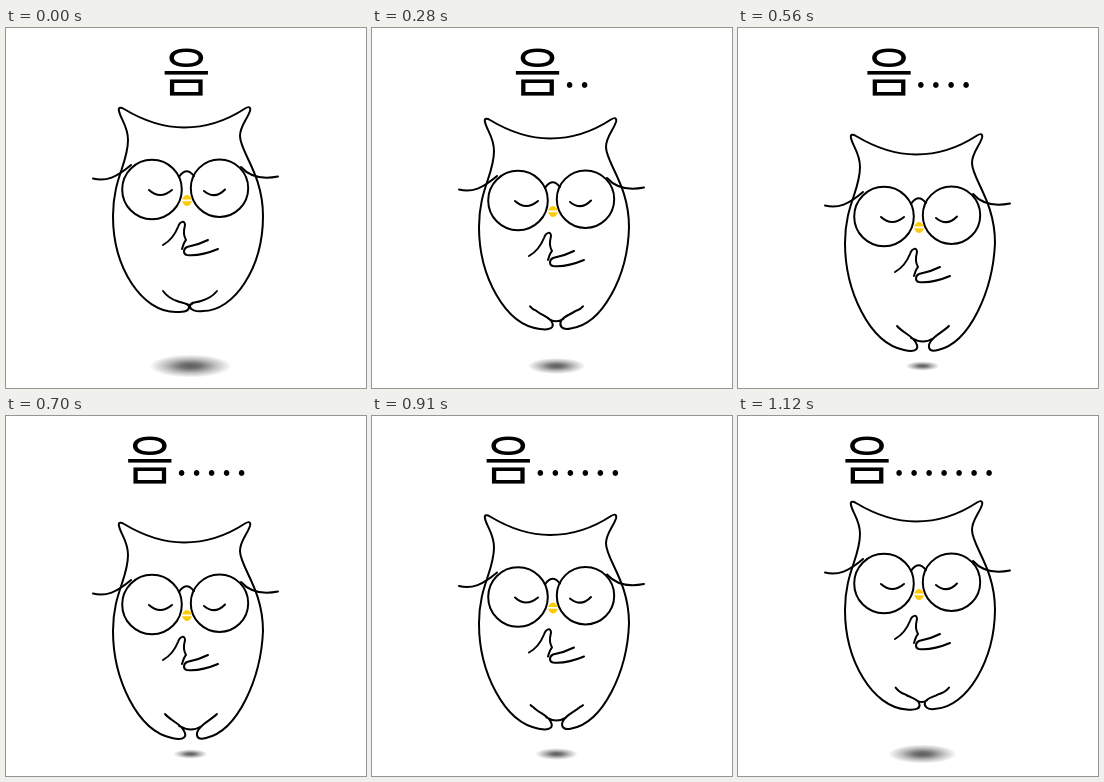
Recreate the animation shown at these times as an HTML page. Size 360 by 360 pixels, loop 1260 ms.

```html
<!DOCTYPE html>
<html lang="ko">
<head>
<meta charset="utf-8">
<title>Thinking owl</title>
<style>
html, body { margin: 0; width: 100%; height: 100%; overflow: hidden; background: #fff; }
svg { display: block; width: 100%; height: 100%; }
text { font-family: "Noto Sans CJK KR", "Noto Sans CJK", sans-serif; }
#word { font-size: 53px; font-weight: 500; text-anchor: middle; }
#dots { font-size: 42px; letter-spacing: 3.3px; }
#owl { fill: none; stroke: #000; stroke-width: 2; stroke-linecap: round; stroke-linejoin: round; }
</style>
</head>
<body>
<svg viewBox="0 0 360 360">
  <defs>
    <radialGradient id="soft">
      <stop offset="0" stop-color="#5c5c5c"/>
      <stop offset=".25" stop-color="#747474"/>
      <stop offset=".6" stop-color="#bdbdbd"/>
      <stop offset="1" stop-color="#fff"/>
    </radialGradient>
  </defs>
  <ellipse id="shadow" cx="184.5" cy="338" fill="url(#soft)"/>
  <text id="word" y="64">음</text>
  <text id="dots" y="59.5"></text>
  <g id="owl">
    <!-- head and shoulders -->
    <path d="M107 188C107 150 122 136 122 112C122 98 115 92 113 83C112 79 115 79 118 81C138 93 157 99.5 178 99.5C200 99.5 220 93 239 80.5C243 78 245 79 244 83C241 92 234 98 234 108C234 124 257 146 257 188"/>
    <path id="belly"/>
    <!-- glasses -->
    <circle cx="146" cy="161.5" r="29.8"/>
    <circle cx="213.5" cy="160.2" r="28.7"/>
    <path d="M173 149Q180 138 188 148M87 150.5C100 154 111 149 125 137M235 139C243 148 254 152 272 148.5"/>
    <!-- closed eyes -->
    <path d="M143 162Q154 172 166 162M198 163Q209 172 219 161.5"/>
    <!-- hands -->
    <path d="M157 217C166 212 170 204 172 199C174 193 179 192 179 197C177 205 178 208 180 212Q178 214 176 221M202 212C192 217 186 218 181 219C177 221 177 226 181 227C190 228 200 226 212 221"/>
    <!-- beak -->
    <path d="M176 171.6Q178 167 181 167T186 171.6ZM176 173.2H186Q184 178 181 178T176 173.2Z" fill="#fbcb0a" stroke="none"/>
  </g>
</svg>
<script>
const el = id => document.getElementById(id);
const LOOP = 1260, STEP = 70;
const drop = [0, 3, 7, 11, 16, 21, 24.5, 27, 28, 27, 25, 22.5, 19.5, 16, 11, 6];

// Lower body with tucked feet, and with feet hanging down
const tucked = "M107 188C107 240 136 284 170 284C179 284 183 283 183 279C183 275 176 275 171 273C165 271 160 267 157 263" +
  "M257 188C257 240 228 283 197 283C190 284 184 282 184 278C184 274 189 275 195 273C202 271 207 268 211 263M181 276Q183 278 186 276";
const hanging = "M107 188C107 235 131 288 166 295C179 298 181 293 178 288C175 281 165 278 159 271C159 271 159 271 159 271" +
  "M257 188C255 235 232 288 200 295C189 298 190 290 193 286C197 280 205 277 211 271C211 271 211 271 211 271M173 283Q185 290 196 283";

function mix(a, b, k) {
  const ends = b.match(/[\d.]+/g);
  let i = 0;
  return a.replace(/[\d.]+/g, n => +n + (ends[i++] - n) * k);
}

function draw(now) {
  const step = Math.min(15, Math.max(0, Math.floor(now % LOOP / STEP) - 1));
  const y = drop[step];
  const stretch = (0.75 * y - 0.01 * y * y) / 13;
  el("owl").setAttribute("transform", `translate(0 ${y})`);
  el("belly").setAttribute("d", mix(tucked, hanging, stretch));

  const spread = 17 + 24 * Math.max(0, 1 - y / 27) ** 1.35;
  el("shadow").setAttribute("rx", spread);
  el("shadow").setAttribute("ry", spread * 0.28);

  const count = Math.min(7, Math.ceil(step / 2));
  const x = 180.3 - 7.3 * count;
  el("word").setAttribute("x", x);
  el("dots").setAttribute("x", x + 26);
  el("dots").textContent = ".".repeat(count);
}

const start = performance.now();
function tick() {
  draw(performance.now() - start);
  requestAnimationFrame(tick);
}
tick();
</script>
</body>
</html>
```
